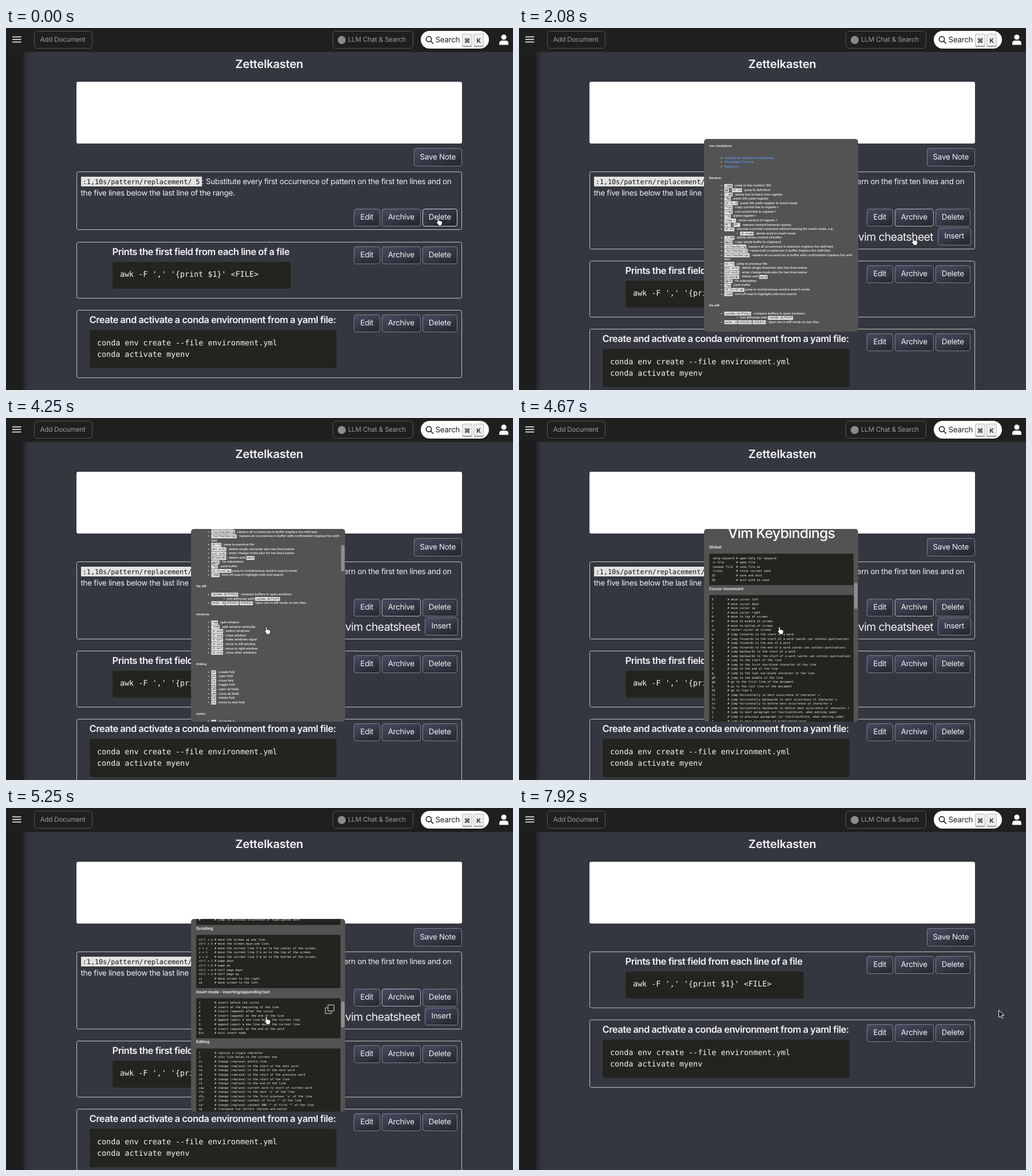
An HTML page for the animation above (8 s loop, 885 by 633 pixels).

```html
<!DOCTYPE html>
<html lang="en">
<head>
<meta charset="utf-8">
<title>Zettelkasten</title>
<style>
html, body { margin: 0; width: 100%; height: 100%; overflow: hidden; background: #353740; }
#stage { position: relative; width: 885px; height: 633px; overflow: hidden; background: #353740;
  font: 13.4px/20.1px Inter, sans-serif; letter-spacing: -.021em; color: #f4f4f6; text-rendering: geometricPrecision; }
#stage div, #stage svg { position: absolute; left: 0; top: 0; box-sizing: border-box; white-space: pre; }
#side { width: 30px; height: 633px; background: #1d1d1d; box-shadow: 0 0 9px 2px #1d1d1d; }
#bar { width: 885px; height: 42px; background: #1f1f1f; }
#stage .top { top: 5px; height: 31px; border: 1px solid #565656; border-radius: 6px; font-size: 11.7px; line-height: 29px; color: #9b9b9b; }
#stage .key { top: 9.5px; width: 18px; height: 23px; border-radius: 3px; background: #eee; border: 1px solid #bbb;
  border-bottom: 2px solid #999; font: 600 11px/22px Inter, "DejaVu Sans", sans-serif; color: #222; text-align: center; }
.btn { border: 1px solid #7e8087; border-radius: 4px; text-align: center; background: linear-gradient(160deg, #464c62, #292b34 85%); }
.btn.lit { border-color: #d5d5d8; background: linear-gradient(160deg, #3d4256, #25272f 85%); }
.btn.focus { border-color: #b4b4b8; }
#stage .card { left: 123px; width: 673px; border: 1px solid #c3c4c8; border-radius: 3.5px; }
.head { font-size: 16.6px; font-weight: 600; letter-spacing: -.033em; }
.big { font-size: 19.5px; letter-spacing: -.035em; }
.block { background: #23241f; border-radius: 4px; padding: 13.5px; color: #f8f8f2; }
.block, pre, code { font-family: "DejaVu Sans Mono", monospace; letter-spacing: 0; }
code { font-size: .875em; background: #e3e3e3; color: #111; padding: 1.7px 3.3px; }
.tip { height: 28px; padding-left: 8px; overflow: hidden; background: #111; color: #fff; font-size: 11.7px; line-height: 28px; }
.arrow { width: 0; height: 0; border: 6px solid transparent; border-top: 0; border-bottom: 5px solid #111; }
#stage #spin { left: 444px; top: 345.5px; width: 31px; height: 31px; border: 4px solid #222; border-top-color: #3ecf9b; border-radius: 50%; }
#stage #popup { left: 323px; top: 194px; width: 269px; height: 336.5px; border-radius: 5px; background: #535353; overflow: hidden; }
#stage #doc { left: 9px; width: 668px; transform-origin: 0 0; color: #fff; letter-spacing: 0; }
#doc h1, #doc h4, #doc pre, #doc p { margin: 0; }
#doc h1 { font: 500 65.6px/80px Inter, sans-serif; letter-spacing: -.03em; text-align: center; margin-bottom: 17.6px; }
#doc h4 { font-size: 14px; font-weight: 600; }
#doc #keys h4 { font-size: 18.3px; }
#doc pre { position: relative; margin: 19px 0 7.2px; padding: 12.5px 12px 13.4px; background: #23241f; border-radius: 4px; color: #f8f8f2; }
#doc section { padding: 15.7px 0 33.7px 70px; font-size: 14.5px; font-weight: 500; }
#doc section p { position: relative; height: 20.1px; }
#doc section code { font-size: .9em; }
#doc i { position: absolute; left: -17px; font-style: normal; }
#doc a { color: #5c9dff; }
#stage #intro { top: 21.9px; }
#stage #keys { top: 1676px; width: 668px; }
#stage #thumb { left: 262px; width: 5.5px; height: 46px; border-radius: 3px; background: #8d8d8d; }
#stage #copy { left: auto; right: 27px; top: 28px; }
</style>
</head>
<body>
<div id="stage"></div>
<script>
const K = .377; // scale of the document preview
const px = (x, y, w, h) => `left:${x}px;top:${y}px;width:${w}px;height:${h}px`;
const text = (s, x, cy, cls = '') => `<div class="${cls}" style="left:${x}px;top:${cy - 10.05}px">${s}</div>`;
const btn = (s, x, y, w, id = '', h = 31) => `<div class="btn" id="${id}" style="${px(x, y, w, h)};line-height:${h - 2}px">${s}</div>`;
const trio = (y, id = '') => btn('Edit', 607, y, 45.5) + btn('Archive', 656, y, 67.5, id) + btn('Delete', 726.5, y, 61.5, id && 'del');
const esc = s => s.replace(/&/g, '&amp;').replace(/</g, '&lt;');

const noteCard = (y, h, x, title, w, bh, code) =>
  `<div class="card" style="top:${y}px;height:${h}px"></div>` + text(title, x, y + 18.5, 'head') +
  `<div class="block" style="${px(x, y + 35, w, bh)}">${esc(code)}</div>` + trio(y + 8);

// List lines: |code| spans, [links], "- " nests, "+ " continues the line above.
const list = (title, body, gap = 15.7) => `<h4>${title}</h4><section style="padding-top:${gap}px">` + body.trim().split('\n').map(line => {
  const nested = line.startsWith('- '), cont = line.startsWith('+ ');
  const html = esc(line.replace(/^[-+] /, '')).replace(/\|(.+?)\|/g, '<code>$1</code>').replace(/\[(.+?)\]$/, '<a>$1</a>');
  return `<p${nested ? ' style="left:73px"' : ''}>${cont ? '' : `<i>${nested ? '◦' : '•'}</i>`}${html}</p>`;
}).join('') + '</section>';

// Code lines: key, two spaces, comment.
const listing = (title, body, pad = 9, extra = '') => `<h4>${title}</h4><pre>` + body.trim().split('\n').map(line => {
  const [key, note] = line.split('  ');
  return esc(key.padEnd(pad) + '# ' + note);
}).join('\n') + extra + '</pre>';

const copyIcon = `<svg id="copy" width="46" height="46" fill="none" stroke="#aaa" stroke-width="4">
<rect x="15" y="3" width="28" height="28" rx="4"/><path d="M11 15H6q-3 0-3 3v22q0 3 3 3h22q3 0 3-3v-5"/></svg>`;

const doc = '<div id="intro">' + list('vim cheatsheet', `
[Zumbel Spreadsheet Cheatsheet]
[Cheatsheet Tutorial]
[Registers]`, 35.6) + list('Random', `
|:100| : jump to line number 100
|gd| / |<C-]>| : jump to definition
|"_dd| : delete line to black hole register
|"0p| : paste 0th yank-register
|<C-r> 0| : paste 0th yank-register in insert mode
|"ryy| : copy current line to register r
|"rdd| : cut current line to register r
|"rp| : paste register r
|:reg r| : show content of register r
|di"| / |di'| : remove content between quotes
|<C-o>| : execute a normal command without leaving the insert mode, e.g.
- |<C-o>dw| : delete word in insert mode
|:1,$d| : delete whole content of buffer
|ggyG| : copy whole buffer to clipboard
|:s/foo/bar/g| : replace all occurences in selection (replace foo with bar)
|:%s/foo/bar/g| : replace all occurences in buffer (replace foo with bar)
|:%s/foo/bar/gc| : replace all occurences in buffer with confirmation (replace foo with
+ bar)
|<C-^>| : jump to previous file
|d<C-v>2j| : delete single character also two lines below
|c<C-v>2j| : enter change mode also for two lines below
|d/<word>| : delete until |word|
|gg=G| : fix indentation
|:%y| : yank buffer
|<C-t>/<C-g>| jump to next/previous word in search mode
|:noh| : turn off search highlight until next search`) + list('file diff', `
|:windo diffthis| : compare buffers in open windows
- Exit diffmode with |:windo diffoff|
|nvim -d| |<FILE1>| |<FILE2>| : open vim in diff mode on two files`) + list('windows', `
|:sp| : split window
|:vsp| : split window vertically
|<C-w>w| : switch windows
|<C-w>q| : close window
|<C-w>=| : make windows equal
|<C-w>h| : move to left window
|<C-w>l| : move to right window
|<C-w>o| : close other windows`) + list('folding', `
|zf| : create fold
|zo| : open fold
|zc| : close fold
|za| : toggle fold
|zR| : open all folds
|zM| : close all folds
|zd| : delete fold
|zj| : move to next fold`) + list('marks', `
|ma| : set mark a
|'a| : jump to line of mark a
|:marks| : list of marks
|:jumps| : list of jumps
|<C-i>| : newer position in jump list
|<C-o>| : older position in jump list
|g;| : older change
|g,| : newer change`) + '</div><div id="keys"><h1>Vim Keybindings</h1>' + listing('Global', `
:help keyword  open help for keyword
:o file  open file
:saveas file  save file as
:close  close current pane
ZZ  save and exit
ZQ  exit with no save`, 14) + listing('Cursor movement', `
h  move cursor left
j  move cursor down
k  move cursor up
l  move cursor right
H  move to top of screen
M  move to middle of screen
L  move to bottom of screen
zz  center cursor on screen
w  jump forwards to the start of a word
W  jump forwards to the start of a word (words can contain punctuation)
e  jump forwards to the end of a word
E  jump forwards to the end of a word (words can contain punctuation)
b  jump backwards to the start of a word
B  jump backwards to the start of a word (words can contain punctuation)
0  jump to the start of the line
^  jump to the first non-blank character of the line
$  jump to the end of the line
g_  jump to the last non-blank character of the line
gM  jump to the middle of the line
gg  go to the first line of the document
G  go to the last line of the document
5G  go to line 5
fx  jump horizontally to next occurrence of character x
Fx  jump horizontally backwards to next occurrence of character x
tx  jump horizontally to before next occurrence of character x
Tx  jump horizontally backwards to before next occurrence of character x
}  jump to next paragraph (or function/block, when editing code)
{  jump to previous paragraph (or function/block, when editing code)
*  jump to next occurrence of highlighted word
#  jump to previous occurrence of highlighted word`) + listing('Scrolling', `
ctrl + y  move the screen up one line.
ctrl + e  move the screen down one line.
z + z  move the current line I'm on to the center of the screen.
z + t  move the current line I'm on to the top of the screen.
z + b  move the current line I'm on to the bottom of the screen.
ctrl + f  page down
ctrl + b  page up
ctrl + d  half page down
ctrl + u  half page up
zs  move screen to the right
ze  move screen to the left`) + listing('Insert mode - inserting/appending text', `
i  insert before the cursor
I  insert at the beginning of the line
a  insert (append) after the cursor
A  insert (append) at the end of the line
o  append (open) a new line below the current line
O  append (open) a new line above the current line
ea  insert (append) at the end of the word
Esc  exit insert mode`, 9, copyIcon) + listing('Editing', `
r  replace a single character
J  join line below to the current one
cc  change (replace) entire line
cw  change (replace) to the start of the next word
ce  change (replace) to the end of the next word
cb  change (replace) to the start of the previous word
c0  change (replace) to the start of the line
c$  change (replace) to the end of the line
caw  change (replace) current word to start of current word
cfu  change (replace) to the next 'u' of the line
cFu  change (replace) to the first previous 'u' of the line
ci"  change (replace) content of first "" of the line
ca"  change (replace) content AND "" of first "" of the line
xp  transpose two letters (delete and paste)
u  undo
.  repeat last command`) + '</div>';

const tooltip = (id, s, x, y) => `<div id="${id}"><div class="arrow" style="left:${x + 16}px;top:${y - 5}px"></div>` +
  `<div class="tip" style="left:${x}px;top:${y}px;width:${873.5 - x}px">${s}</div></div>`;

document.getElementById('stage').innerHTML = `
<div id="side"></div><div id="bar"></div>
<svg width="885" height="42" fill="#fff"><path d="M11 15.5h15.5M11 20h15.5M11 24.5h15.5" stroke="#fff" stroke-width="1.5"/>
<circle cx="869" cy="16" r="4.6"/><path d="M861 29.5v-2.5q0-5 5-5h6q5 0 5 5v2.5z"/></svg>
<div class="top" style="left:49px;width:101.5px;padding-left:9.5px">Add Document</div>
<div class="top" style="left:569.5px;width:141px;padding-left:26.5px">LLM Chat &amp; Search</div>
<div style="${px(578.5, 13.5, 14, 14)};border-radius:50%;background:#8b8b8b"></div>
<div style="${px(723.5, 5, 119.5, 31)};border-radius:16px;background:#fff"></div>
<svg width="20" height="20" style="left:730px;top:11px" fill="none" stroke="#222" stroke-width="1.7"><circle cx="8" cy="8.5" r="4.6"/><path d="M11.4 12l4.4 4.4"/></svg>
${text('<span style="color:#222">Search</span>', 749.5, 21)}
<div class="key" style="left:796px">⌘</div><div class="key" style="left:816px">K</div>
<div style="${px(123, 48, 673, 30)};line-height:30px;text-align:center;font-size:20.2px;font-weight:600">Zettelkasten</div>
<div style="${px(123, 94, 673, 108)};border-radius:3px;background:#fff"></div>
${btn('Save Note', 711.5, 210, 84.5, '', 32)}
<div id="note"><div class="card" id="noteBox" style="top:250.5px"></div>
${text('<code>:1,10s/pattern/replacement/ 5</code>: Substitute every first occurrence of pattern on the first ten lines and on\nthe five lines below the last line of the range.', 130.5, 268.7)}
${trio(316, 'archive')}
<div id="spin"></div>
<div id="match"><svg width="18" height="18" style="left:569.5px;top:355.5px"><rect width="17.5" height="17.5" rx="2.5" fill="#fff"/><path d="M2.5 3.2h12.5" stroke="#353740" stroke-width="1.4"/><path d="M7 6.5h3.6v3h3L8.8 14.5 4 9.5h3z" fill="#353740"/></svg>
${text('vim cheatsheet', 592, 365.5, 'big')}${btn('Insert', 731, 349, 57.5, 'insert')}</div></div>
<div id="rest">
${noteCard(0, 99, 185.5, 'Prints the first field from each line of a file', 311.5, 47, "awk -F ',' '{print $1}' <FILE>")}
${noteCard(119.5, 119, 145.5, 'Create and activate a conda environment from a yaml file:', 431.5, 67, 'conda env create --file environment.yml\nconda activate myenv')}
</div>
${tooltip('archiveTip', 'Archive zettel into suggested document', 656, 351)}
${tooltip('insertTip', 'Insert zettel into document', 742, 386)}
<div id="popup"><div id="doc">${doc}</div><div id="thumb"></div></div>
<svg id="hand" width="14" height="17" viewBox="4 1 14 17" overflow="visible"><path d="M4 1.2c.9 0 1.3.7 1.3 1.5v3.2c.9-.5 1.8-.2 2.1.5.9-.4 1.7 0 1.9.7.9-.3 1.9.1 1.9 1.3 0 2.3-.4 3-1 4.2-.2.5-.3 1.2-.3 1.8H4.6c-.4-1.2-1.4-2.6-2.4-3.8C1.3 9.5.4 8.6.9 8c.6-.7 1.4-.2 1.8.4V2.7C2.7 1.9 3.1 1.2 4 1.2z" fill="#fff" stroke="#111" stroke-width=".9"/></svg>
<svg id="pointer" width="14" height="18" viewBox="1 1 14 18" overflow="visible"><path d="M1 1v12.6l3-2.8 2 4.3 2.2-1-2-4.2h4.2z" fill="#111" stroke="#fff"/></svg>`;

const el = Object.fromEntries([...document.querySelectorAll('[id]')].map(e => [e.id, e]));
const show = (e, on) => e.style.visibility = on ? 'inherit' : 'hidden';
const during = (t, a, b) => t >= a && t < b;

// Linear interpolation through [time, ...values] keys.
function track(keys, t) {
  const i = keys.findIndex(k => k[0] > t);
  if (i < 0) return keys.at(-1).slice(1);
  if (!i) return keys[0].slice(1);
  const a = keys[i - 1], b = keys[i], f = (t - a[0]) / (b[0] - a[0]);
  return a.slice(1).map((v, n) => v + (b[n + 1] - v) * f);
}
const cursorKeys = [[0, 754.5, 332], [250, 692.5, 328.5], [1667, 692.5, 328.5], [2083, 688.5, 366.5], [3417, 688.5, 366.5],
  [3750, 454.5, 365], [5500, 454.5, 365], [6000, 606, 385], [6083, 606, 385], [6667, 728.5, 399], [6917, 757, 366],
  [7583, 757, 366], [7916, 837.5, 353.5]];
const scrollKeys = [[3917, 0], [4250, 190], [4666, 640], [4750, 665], [4833, 705], [5083, 930], [5250, 982.5], [5417, 990]];

function render(ms) {
  const step = 1000 / 12, t = Math.floor((ms + 4) / step) * step + .5;
  const filed = t >= 7583, loading = during(t, 830, 1250), matched = t >= 1250;
  show(el.note, !filed);
  el.noteBox.style.height = (matched ? 136 : loading ? 132.5 : 102.5) + 'px';
  el.rest.style.top = (filed ? 250.5 : matched ? 406.5 : loading ? 403.5 : 373.5) + 'px';
  show(el.spin, loading);
  el.spin.style.transform = `rotate(${(t - 820) * .36}deg)`;
  show(el.match, matched && !filed);
  el.del.classList.toggle('lit', t < 160);
  el.archive.classList.toggle('lit', during(t, 160, 1830));
  el.archive.classList.toggle('focus', during(t, 1830, 7416));
  el.insert.classList.toggle('lit', t >= 6833);
  show(el.archiveTip, during(t, 330, 1830));
  show(el.insertTip, during(t, 7000, 7583));

  const [scroll] = track(scrollKeys, t);
  show(el.popup, during(t, 2083, 6000));
  el.doc.style.transform = `translateY(${-scroll}px) scale(${K})`;
  show(el.thumb, during(t, 4000, 6000));
  el.thumb.style.top = .6 + scroll * .146 + 'px';
  show(el.copy, during(t, 5166, 6000));

  const [x, y] = track(cursorKeys, t), hand = t < 6000 || during(t, 6833, 7583);
  for (const c of [el.hand, el.pointer]) c.style.transform = `translate(${x}px,${y}px)`;
  show(el.hand, hand);
  show(el.pointer, !hand);
}
const start = performance.now();
function frame() {
  render((performance.now() - start) % 8000);
  requestAnimationFrame(frame);
}
frame();
</script>
</body>
</html>
```
